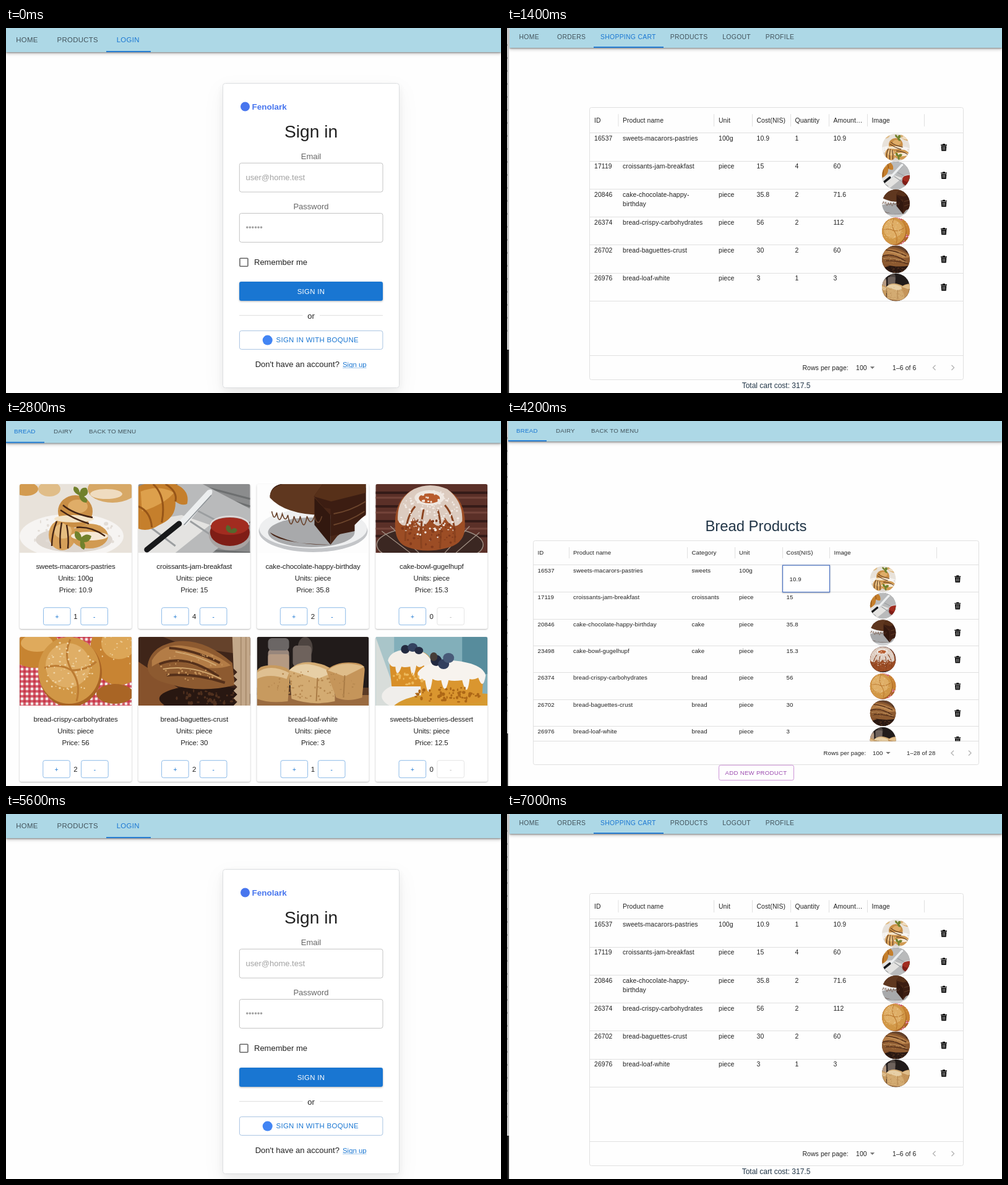
Write an HTML page that moves like this. It is 800 px wide and 590 px high and loops after 8000 ms.

```html
<!DOCTYPE html>
<html lang="en">
<head>
<meta charset="utf-8">
<title>Bakery shop</title>
<style>
html, body { margin: 0; width: 100%; height: 100%; overflow: hidden; background: #fefefe; }
svg { display: block; width: 800px; height: 590px; font-family: "Liberation Sans", Arial, sans-serif; }
.scene { opacity: 0; animation: 8s step-end infinite; }
#login { animation-name: login; }
#cart { animation-name: cart; }
#shop { animation-name: shop; }
#admin { animation-name: admin; }
@keyframes login { 0% { opacity: 1 } 17.5% { opacity: 0 } 70% { opacity: 1 } 87.5%, 100% { opacity: 0 } }
@keyframes cart { 0% { opacity: 0 } 17.5% { opacity: 1 } 35% { opacity: 0 } 87.5%, 100% { opacity: 1 } }
@keyframes shop { 0% { opacity: 0 } 35% { opacity: 1 } 52.5%, 100% { opacity: 0 } }
@keyframes admin { 0% { opacity: 0 } 52.5% { opacity: 1 } 70%, 100% { opacity: 0 } }
.bar { filter: drop-shadow(0 1px 1px rgba(0,0,0,.35)) drop-shadow(0 2px 2.5px rgba(0,0,0,.25)); }
.panel { filter: drop-shadow(0 4px 7px rgba(10,15,25,.06)) drop-shadow(0 12px 15px rgba(10,15,25,.05)); }
.card { filter: drop-shadow(0 1px 1px rgba(0,0,0,.28)); }
.lift { filter: drop-shadow(0 1.5px 1.5px rgba(0,0,0,.3)); }
</style>
</head>
<body>
<svg id="stage" viewBox="0 0 800 590"></svg>
<script>
const BLUE = '#1976d2', INK = '#212121', LINE = '#e0e0e0';

// y is the middle of the capitals
const text = (x, y, s, size, { fill = INK, ls = 0, mid = false, more = '' } = {}) =>
  `<text x="${x}" y="${y + size * .36}" font-size="${size}" fill="${fill}" letter-spacing="${ls}em"` +
  `${mid ? ' text-anchor="middle"' : ''} ${more}>${s}</text>`;
const box = (x, y, w, h, fill, more = '') =>
  `<rect x="${x}" y="${y}" width="${w}" height="${h}" fill="${fill}" ${more}/>`;
const frame = (x, y, w, h, stroke, r = 3, more = '') =>
  box(x, y, w, h, 'none', `rx="${r}" stroke="${stroke}" ${more}`);
const oval = (x, y, rx, ry, fill, more = '') =>
  `<ellipse cx="${x}" cy="${y}" rx="${rx}" ry="${ry}" fill="${fill}" ${more}/>`;
const shape = (d, fill) => `<path d="${d}" fill="${fill}"/>`;
const line = (d, stroke, w = 1, more = '') =>
  `<path d="${d}" fill="none" stroke="${stroke}" stroke-width="${w}" ${more}/>`;

let seed = 7;
const rand = () => (seed = seed * 16807 % 2147483647) / 2147483647;
const specks = (n, x, y, rx, ry, fill, r = 1) => {
  let s = '';
  while (n--) {
    const a = rand() * 6.283, d = Math.sqrt(rand());
    const px = (x + Math.cos(a) * d * rx).toFixed(1), py = (y + Math.sin(a) * d * ry).toFixed(1);
    s += oval(px, py, r * (.5 + rand()), r * (.5 + rand()), fill);
  }
  return s;
};

// each picture is 181 x 111
const photos = [
  () => box(0, 0, 181, 111, '#e8e2da') + oval(150, 8, 40, 22, '#d7a866') + oval(140, 16, 26, 8, '#efdcc0') +
    oval(10, 8, 20, 11, '#d39b50') + oval(48, 8, 18, 12, '#e0bd88') +
    oval(84, 84, 84, 36, '#f6f4f2') + oval(88, 90, 62, 20, '#ddd6cf') + specks(40, 84, 84, 80, 32, '#e2dcd6', 2) +
    oval(69, 82, 22, 25, '#d6a05a') + oval(70, 76, 14, 12, '#e6bd80') +
    oval(113, 84, 30, 20, '#d19a52') + oval(113, 84, 30, 7, '#f6e9d6') +
    oval(90, 44, 28, 26, '#c98e45') + oval(88, 56, 32, 6, '#f4e4c8') + oval(94, 36, 16, 11, '#dfad68') +
    line('M70 34q16 14 48 20M66 42q20 14 46 22M60 60q-8 20-8 40M68 62q-4 22-2 42M76 66q4 20 2 38M92 70q24-2 46 14', '#432414', 2.4) +
    shape('M96 18q-12-6-8-14 8 0 9 10 2-10 11-8 6 10-4 14 8 4 4 10-10 0-12-12zM98 92q-12-4-8-16 8 0 10 10 8-8 16-2-2 10-12 10 4 6 0 12-8-2-6-14z', '#71812c'),
  () => box(0, 0, 181, 111, '#8b8c8d') + line('M60 0L181 36M90 0L181 24M0 100L181 111M110 40L181 62', '#6d6f70', 3) +
    shape('M64 0H104L181 40V60L120 111H40L0 88V60z', '#b9babb') + shape('M0 62L70 50L116 66L60 111H0z', '#e4e3e1') +
    line('M20 70L60 100M90 40L140 66M84 60L120 84', '#9b9ea0', 3) +
    shape('M0 4Q30-10 60 0Q84 10 79 32Q70 36 60 28Q62 54 34 66Q16 78 0 72z', '#c57f2c') +
    shape('M4 12Q34 0 58 14Q40 34 6 44z', '#dda04c') + line('M24 0Q46 20 38 62M44 0Q64 12 60 28M0 36Q20 44 22 70', '#965518', 3) +
    shape('M66 60L112 10Q122 6 119 16L76 68z', '#eceeef') + line('M74 66L118 18', '#888e92', 1.5) +
    line('M14 106L66 64', '#17181a', 9, 'stroke-linecap="round"') +
    oval(148, 82, 34, 25, '#a9a3a2') + oval(148, 78, 32, 22, '#7f1d16') + oval(148, 68, 31, 14, '#a22c20') +
    line('M117 66a31 14 0 0 1 62 0', '#e2dcdb', 2) + shape('M146 78q-8-6-2-12 6 2 6 8 6-6 10 0-2 8-14 4z', '#55682d'),
  () => box(0, 0, 181, 111, '#fdfdfd') + oval(91, 76, 88, 34, '#c3c5c8') + oval(91, 72, 87, 32, '#eeeff0') +
    oval(88, 78, 70, 24, '#a8a9ab') +
    shape('M21 20V78Q34 96 119 98V50L94 34L119 20L176 6V50L130 84L119 98Q60 100 21 78z', '#492617') +
    shape('M21 20Q22 4 38 0H176V48L158 66V76L119 84V40Z', '#3c1d12') +
    shape('M21 22Q20 6 42 0H106L92 20L119 50Q48 52 21 22z', '#5f371f') + shape('M106 0H176V14L120 28L92 20z', '#573019') +
    shape('M93 22L119 50V98L93 66z', '#32180f') +
    line('M24 44q4 18 8 2q4 22 9 2q5 16 9 2q5 28 10 2q6 20 10 0q6 28 11 0q6 18 12 0q6 20 12 0', '#68412a', 1.6) +
    line('M124 48Q150 44 176 28M124 66Q150 60 174 44', '#6c452c', 2),
  () => box(0, 0, 181, 111, '#5b3028') + line('M0 14H181M0 36H181M0 60H181M0 84H181', '#351b18', 4) +
    line('M0 22H181M0 46H181M0 72H181', '#74443a', 3) +
    oval(88, 98, 86, 30, '#3b2722', 'stroke="#9b8b80" stroke-width="1.5"') +
    line('M10 76L56 111M24 68L70 111M152 68L112 111M168 78L130 111', '#a29185', 1.2) +
    shape('M32 74Q28 28 58 10Q88-4 118 10Q148 28 144 74Q142 98 112 104Q80 112 52 102Q34 96 32 74z', '#9c4d25') +
    shape('M36 58Q34 24 62 8Q88-4 116 8Q142 28 140 60Q126 78 112 54Q104 80 88 56Q74 82 62 54Q46 78 36 58z', '#dccbbf') +
    oval(87, 22, 24, 12, '#efe7e0') + oval(87, 23, 17, 8, '#b75b2d') +
    line('M64 36Q48 54 48 92M78 40Q72 66 74 104M100 40Q108 64 104 104M112 34Q130 54 128 94', '#8a431f', 3) +
    specks(130, 88, 52, 50, 42, '#f1e9e3', 1.4) + specks(50, 88, 78, 50, 24, '#823a1c', 1.6),
  () => {
    let s = box(0, 0, 181, 111, '#f3e6e4');
    for (let i = 0; i < 24; i++) s += line(`M${i * 8} 0V111M0 ${i * 8}H181`, '#c62a3e', 4, 'opacity=".7"');
    return s + oval(24, 18, 42, 32, '#c78431') + oval(28, 10, 26, 14, '#dfaa5c') +
      oval(160, 22, 46, 56, '#c88433') + oval(160, 10, 28, 26, '#dca657') + oval(154, 92, 30, 16, '#a96525') +
      oval(82, 58, 51, 55, '#a96424') + oval(80, 54, 50, 54, '#d19746') + oval(78, 46, 36, 36, '#dfae66') +
      line('M82 4Q70 30 84 54Q100 76 92 104M40 50Q64 42 84 54Q108 54 124 40', '#bc7b32', 3) +
      specks(70, 80, 50, 42, 44, '#efd4a4', 1.2) + specks(25, 160, 20, 30, 30, '#edcd96', 1.1);
  },
  () => box(0, 0, 181, 111, '#3f2519') + shape('M0 40L70 86L40 111H0z', '#86522c') + shape('M40 0H181V30L80 16z', '#65422b') +
    oval(110, 100, 76, 22, '#281711') + specks(50, 110, 98, 60, 12, '#50301e', 2) +
    shape('M15 46Q20 16 58 8Q104 0 152 42L156 78Q100 92 50 76Q14 68 15 46z', '#8d5a30') +
    shape('M22 38Q36 12 70 14Q112 18 150 46Q120 56 84 44Q48 30 22 48z', '#b37c46') +
    line('M34 44Q76 26 130 64M46 62Q92 58 140 74M50 18Q88 20 132 42', '#55301a', 4) +
    line('M40 52Q86 44 134 68M60 24Q96 30 126 46', '#d0a66f', 2) + specks(50, 88, 48, 52, 24, '#c6945b', 1.2) +
    shape('M152 0H181V111H154l6-6-6-6 6-6-6-6 6-6-6-6 6-6-6-6 6-6-6-6z', '#c3a88a') + line('M166 0V111M174 0V111', '#aa8d6e', 2),
  () => box(0, 0, 181, 111, '#211b1a') + oval(78, 18, 12, 18, '#4d4440') + box(18, 20, 34, 42, '#98867b', 'rx="6"') +
    box(18, 2, 34, 20, '#6b6665', 'rx="6"') + box(18, 28, 34, 28, '#b59a83', 'rx="4"') + box(58, 14, 30, 34, '#6e625c', 'rx="6"') +
    box(0, 90, 181, 21, '#9a6b40') + box(0, 82, 181, 12, '#5a3b26') +
    shape('M0 56Q4 44 30 46Q52 48 54 58L50 104Q20 108 0 100z', '#c79a5f') + shape('M0 58Q20 42 52 58L48 68Q20 58 0 68z', '#dfc091') +
    shape('M52 54Q70 34 104 44Q124 50 126 62V104Q90 112 56 100z', '#d3ab72') + shape('M52 54Q76 32 122 58L98 68z', '#e7cfa6') +
    shape('M112 54Q130 38 160 42Q176 44 174 56L170 98Q146 106 128 98z', '#c5955a') + shape('M114 54Q136 36 174 48L142 64z', '#dfbd8a') +
    line('M98 66L96 104M142 62L140 98', '#a97b45', 2) + specks(70, 88, 78, 76, 24, '#b5874f', 1.2),
  () => box(0, 0, 181, 111, '#82afba') + box(0, 0, 30, 111, '#a9c5c9') + box(140, 0, 41, 60, '#578c9c') +
    shape('M0 0L40 111H0z', '#d8ddda') + oval(90, 96, 80, 28, '#f0eeeb') + shape('M30 111Q60 84 181 92V111z', '#d69a31') +
    shape('M22 36Q28 20 60 22Q88 22 90 42V80H26z', '#d88f28') +
    shape('M20 38Q24 20 58 20Q86 22 92 44Q84 60 78 46Q70 52 66 46Q60 78 56 48Q46 50 42 48Q34 70 32 48Q24 50 20 38z', '#f3eee8') +
    shape('M72 60Q78 42 122 40Q170 44 174 62L172 104Q120 116 74 102z', '#da962f') +
    shape('M68 58Q78 40 124 38Q172 42 178 62Q174 88 166 66Q158 70 152 68Q148 102 140 70Q126 72 118 70Q112 98 106 70Q98 72 92 68Q86 108 80 70Q68 72 68 58z', '#f7f3ee') +
    oval(48, 20, 7, 7, '#232a40') + oval(60, 17, 8, 7, '#344260') + oval(70, 22, 7, 6, '#252c44') +
    oval(98, 38, 9, 9, '#222940') + oval(110, 44, 9, 8, '#33405e') + oval(118, 34, 9, 8, '#485a78') + oval(94, 32, 6, 7, '#463d37') +
    specks(60, 120, 94, 56, 13, '#ad6716', 2) + specks(20, 52, 66, 26, 12, '#edb95c', 2)
];

// id, name, category, unit, price, amount in cart
const goods = [
  [16537, 'sweets-macarors-pastries', 'sweets', '100g', 10.9, 1],
  [17119, 'croissants-jam-breakfast', 'croissants', 'piece', 15, 4],
  [20846, 'cake-chocolate-happy-birthday', 'cake', 'piece', 35.8, 2],
  [23498, 'cake-bowl-gugelhupf', 'cake', 'piece', 15.3, 0],
  [26374, 'bread-crispy-carbohydrates', 'bread', 'piece', 56, 2],
  [26702, 'bread-baguettes-crust', 'bread', 'piece', 30, 2],
  [26976, 'bread-loaf-white', 'bread', 'piece', 3, 1],
  [0, 'sweets-blueberries-dessert', 'sweets', 'piece', 12.5, 0]
];

const defs = '<defs><clipPath id="round"><circle cx="90.5" cy="55.5" r="55.5"/></clipPath>' +
  '<clipPath id="top"><path d="M0 111V3Q0 0 3 0H178Q181 0 181 3V111z"/></clipPath>' +
  '<clipPath id="rows"><rect x="42" y="193" width="721" height="324.5"/></clipPath>' +
  photos.map((draw, i) => `<g id="pic${i}">${draw()}</g>`).join('') + '</defs>';

const avatar = (i, x, y, r) =>
  `<g transform="translate(${x} ${y}) scale(${r / 55.5}) translate(-90.5 -55.5)"><g clip-path="url(#round)"><use href="#pic${i}"/></g></g>`;
const bin = (x, y) => `<g transform="translate(${x} ${y})">` +
  shape('M-5-4.6h3v-1.2h4v1.2h3v1.4h-10zM-4.3-2.6h8.6l-.6 8.2h-7.4z', '#000') +
  line('M-1.8-1.4v5.6M0-1.4v5.6M1.8-1.4v5.6', '#fff', .6) + '</g>';

const nav = (x, h, y, size, ls, tabs, active, from, to) =>
  box(x, 0, 800 - x, h, '#add8e6', 'class="bar"') +
  tabs.map(([tx, s]) => text(tx, y, s, size, { ls, fill: s === active ? BLUE : '#42525a' })).join('') +
  box(from, h - 1.8, to - from, 1.8, BLUE);

const edge = (w, dark) => box(0, 0, w, dark, '#c6c6c6') + box(0, dark, w, 590 - dark, '#1b1b1b') +
  line(`M.5 26V${dark - 20}`, '#8e8e8e', 1, 'stroke-dasharray="3 18"');

const pager = (size, y, xs, range) => {
  const [label, count, arrow, span, prev, next] = xs, ls = .0107;
  return text(label, y, 'Rows per page:', size, { ls }) + text(count, y, '100', size, { ls }) +
    shape(`M${arrow - 3.7} ${y - 1.8}h7.4l-3.7 3.7z`, '#757575') + text(span, y, range, size, { ls }) +
    line(`M${prev + 2} ${y - 4}l-4 4l4 4M${next - 2} ${y - 4}l4 4l-4 4`, '#b5b5b5', 1.4);
};

const header = (cols, seps, y, size, half) =>
  cols.map(([x, s]) => text(x, y, s, size, { ls: .0107 })).join('') +
  seps.map(x => line(`M${x} ${y - half}v${half * 2}`, LINE)).join('');

function login() {
  const cx = 493, grey = '#666', tab = { ls: .0286, mid: true };
  return nav(0, 39, 18.7, 11.4, .0286, [[16.2, 'HOME'], [82.5, 'PRODUCTS'], [178.7, 'LOGIN']], 'LOGIN', 162, 234) +
    box(350.5, 89.5, 285, 492, '#fff', 'rx="4" stroke="#dcdee0" class="panel"') +
    oval(386.5, 127, 7.5, 7.5, '#4876ee') +
    text(397.5, 127, 'Fenolark', 13.5, { fill: '#4876ee', more: 'font-weight="700"' }) +
    text(cx, 166.8, 'Sign in', 28.2, { mid: true }) +
    text(cx, 207.3, 'Email', 13, { mid: true, fill: grey }) + frame(377.3, 218.3, 231.7, 46.8, '#c4c4c4', 3.3) +
    text(387.5, 241.7, 'user@home.test', 13, { fill: '#a2a2a2' }) +
    text(cx, 288.7, 'Password', 13, { mid: true, fill: grey }) + frame(377.3, 299.5, 231.7, 46.8, '#c4c4c4', 3.3) +
    text(387.5, 322.5, '••••••', 13, { fill: '#a2a2a2' }) +
    frame(377.9, 372.3, 13, 13, '#666', 1, 'stroke-width="1.6"') + text(401, 378.5, 'Remember me', 13) +
    box(377, 410, 232, 31, BLUE, 'rx="3.3" class="lift"') + text(cx, 425.7, 'SIGN IN', 11.4, { ...tab, fill: '#fff' }) +
    line('M377 464.5H479.5M507 464.5H609', LINE) + text(cx, 465, 'or', 13, { mid: true }) +
    frame(377.4, 489.4, 231.5, 30, '#a9c4e2', 3.3) + oval(422.7, 504.6, 8, 8, '#4285f4') +
    text(436.5, 504.3, 'SIGN IN WITH BOQUNE', 11.4, { ls: .0286, fill: BLUE }) +
    text(402.7, 543.3, "Don't have an account?", 13) + text(544, 544, 'Sign up', 11.4, { fill: BLUE }) +
    line('M544 549.5H582.5', '#a3c8ed');
}

function cart() {
  const size = 10.4, pitch = 45.2, xs = [141, 187, 342, 403.5, 465.5, 527.5, 589.5];
  const names = ['ID', 'Product name', 'Unit', 'Cost(NIS)', 'Quantity', 'Amount…', 'Image'];
  let total = 0;
  let s = nav(4, 32, 14, 10.4, .0286, [[19.5, 'HOME'], [81, 'ORDERS'], [151, 'SHOPPING CART'], [263.8, 'PRODUCTS'],
    [348.3, 'LOGOUT'], [417.7, 'PROFILE']], 'SHOPPING CART', 140, 253) + edge(3.2, 520) +
    frame(133.5, 128.5, 604, 440, LINE) + line('M133 169.5H737M133 529.5H737', LINE) +
    header(xs.map((x, i) => [x, names[i]]), [180, 334.5, 396.5, 458.5, 520.5, 582.5, 674.5], 149.2, size, 10);
  goods.filter(g => g[0] && g[5]).forEach(([id, name, , unit, price, n], i) => {
    const y = 178.5 + i * pitch, sum = +(price * n).toFixed(1), cell = (x, v, dy = 0) => text(x, y + dy, v, size, { ls: .0107 });
    const parts = name.length > 28 ? [name.slice(0, -8), name.slice(-8)] : [name];
    total += sum;
    s += [id, , unit, price, n, sum].map((v, k) => cell(xs[k], v)).join('') +
      parts.map((p, k) => cell(xs[1], p, k * 15)).join('') +
      line(`M133 ${Math.round(169.5 + (i + 1) * pitch) + .5}H737`, LINE) +
      avatar(goods.findIndex(g => g[0] === id), 628.5, y + 14.6, 22.4) + bin(706, y + 14.6);
  });
  return s + pager(size, 549, [477.5, 564, 590.5, 623, 690.5, 720.5], '1–6 of 6') +
    text(435, 577.5, 'Total cart cost: ' + total.toFixed(1), 12, { mid: true, fill: '#213547' });
}

function shop() {
  let s = nav(0, 35.5, 16.5, 9.9, .012, [[13, 'BREAD'], [77, 'DAIRY'], [134, 'BACK TO MENU']], 'BREAD', 0, 62);
  goods.forEach(([, name, , unit, price, n], i) => {
    const x = 22 + i % 4 * 191.75, y = i < 4 ? 102 : 349, cx = x + 90.5, out = n === 1 ? 52 : 52.7;
    const row = (dy, v) => text(cx, y + dy, v, 11.5, { mid: true, ls: -.0125 });
    const button = (bx, sign, on) => frame(bx, y + 199.7, 43.6, 28, on ? '#8cbae8' : '#e4e4e4') +
      text(bx + 21.8, y + 214.3, sign, 10, { mid: true, fill: on ? BLUE : '#bdbdbd' });
    s += box(x, y, 181, 234, '#fff', 'rx="3" class="card"') +
      `<g transform="translate(${x} ${y})"><g clip-path="url(#top)"><use href="#pic${i}"/></g></g>` +
      row(133, name) + row(152, 'Units: ' + unit) + row(171, 'Price: ' + price) + row(214, n) +
      button(cx - out, '+', true) + button(cx + out - 43.6, '-', n > 0);
  });
  return s;
}

function admin() {
  const size = 9.65, pitch = 43.4, xs = [49.5, 107, 298.5, 375, 451.5, 528.5];
  const names = ['ID', 'Product name', 'Category', 'Unit', 'Cost(NIS)', 'Image'];
  let s = nav(2, 33, 15.7, 9.7, .0286, [[15, 'BREAD'], [79, 'DAIRY'], [136, 'BACK TO MENU']], 'BREAD', 2, 64) + edge(1.6, 505) +
    text(402.5, 169.8, 'Bread Products', 23.8, { mid: true, fill: '#213547' }) +
    frame(42.5, 193.5, 720, 362, LINE) + line('M42 232.5H762M42 517.5H762', LINE) +
    header(xs.map((x, i) => [x, names[i]]), [100.5, 291.5, 368.5, 445.5, 521.5, 694.5], 213, size, 9) +
    '<g clip-path="url(#rows)">';
  goods.slice(0, 7).forEach((g, i) => {
    const y = 241.4 + i * pitch;
    s += g.slice(0, 5).map((v, k) => i || k < 4 ? text(xs[k], y, v, size, { ls: .0107 }) : '').join('') +
      line(`M42 ${Math.round(232.7 + (i + 1) * pitch) + .5}H762`, LINE) +
      avatar(i, 607.6, y + 13.8, 20.8) + bin(728.3, y + 14);
  });
  return s + '</g>' + box(445.5, 233.2, 76, 43.4, '#fff', 'stroke="#4a72c4" stroke-width="1.2" class="card"') +
    text(456.5, 255.3, '10.9', size, { ls: .0107 }) +
    pager(size, 536.7, [511.5, 591, 616, 646, 720, 748], '1–28 of 28') +
    frame(342.5, 556.3, 121, 24.4, '#cd93d7') +
    text(402.5, 568.6, 'ADD NEW PRODUCT', 9.65, { mid: true, ls: .0286, fill: '#9c4bb0' });
}

document.getElementById('stage').innerHTML = defs +
  [login, cart, shop, admin].map(f => `<g id="${f.name}" class="scene">${box(0, 0, 800, 590, '#fefefe')}${f()}</g>`).join('');
</script>
</body>
</html>
```
